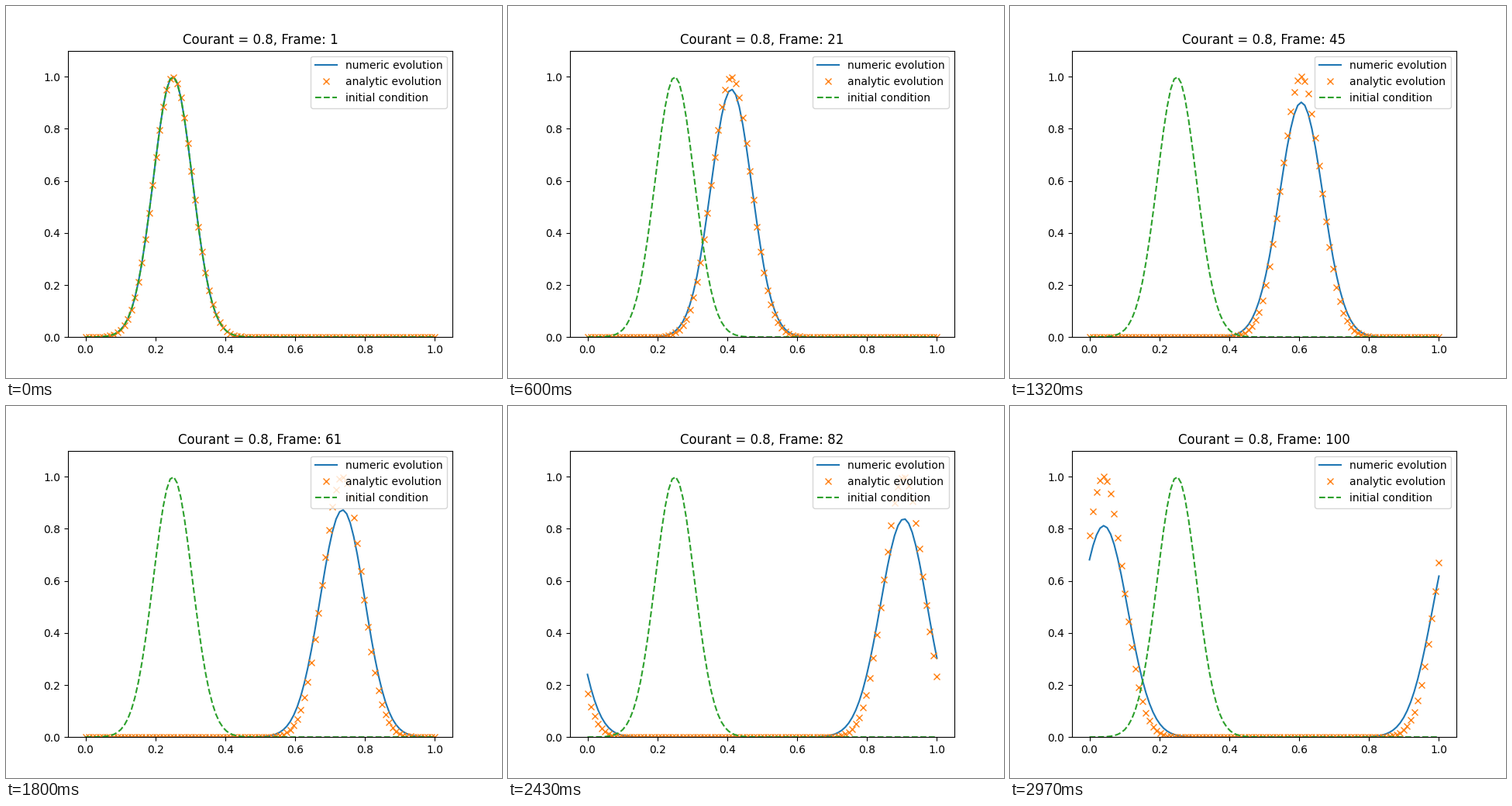
Recreate the animation shown at these times as a matplotlib script. Size 640 by 480 pixels, loop 3 s.

```python
import numpy as np
import matplotlib.pyplot as plt
from matplotlib.animation import FuncAnimation

CELLS = 100
STEPS = 100
COURANT = 0.8

x = np.linspace(0, 1, CELLS)
cell = np.arange(CELLS)
centre = 0.25 * (CELLS - 1)


def pulse(shift):
    """Gaussian moved by a number of cells on a periodic grid."""
    d = (cell - centre - shift + CELLS / 2) % CELLS - CELLS / 2
    return np.exp(-160 * (d / (CELLS - 1)) ** 2)


def upwind(u):
    return u - COURANT * (u - np.roll(u, 1))


start = pulse(0)
states = [start]
for _ in range(STEPS - 1):
    states.append(upwind(states[-1]))

fig, ax = plt.subplots(figsize=(6.4, 4.8), dpi=100)
numeric, = ax.plot(x, start, label="numeric evolution")
analytic, = ax.plot(x, start, "x", label="analytic evolution")
ax.plot(x, start, "--", label="initial condition")
ax.set_ylim(0, 1.1)
ax.legend(loc="upper right")
title = ax.set_title("")


def update(n):
    numeric.set_ydata(states[n])
    analytic.set_ydata(pulse(COURANT * n))
    title.set_text(f"Courant = {COURANT}, Frame: {n + 1}")
    return numeric, analytic, title


anim = FuncAnimation(fig, update, frames=STEPS, interval=30,
                     repeat=True, repeat_delay=0, blit=False)
plt.show()
```
